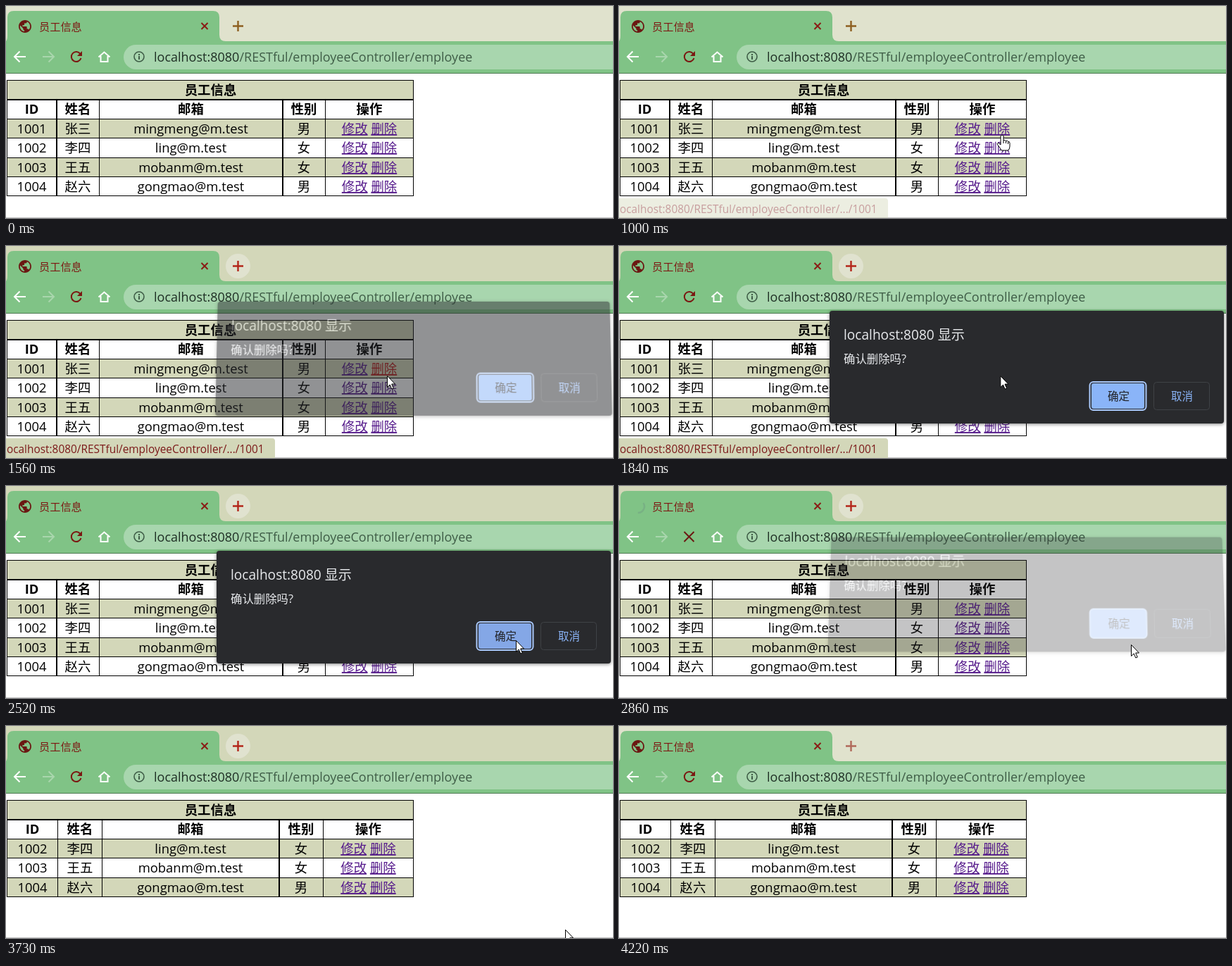
Recreate the animation shown at these times as an HTML page. Size 862 by 301 pixels, loop 4.55 s.

```html
<!DOCTYPE html>
<html lang="zh-CN">
<head>
<meta charset="utf-8">
<style>
html, body { margin: 0; width: 100%; height: 100%; overflow: hidden; background: #fff; }
body { position: relative; font-family: "Open Sans", "Noto Sans CJK SC", "Noto Sans CJK", sans-serif; }
svg { position: absolute; left: 0; top: 0; display: block; }
text { white-space: pre; }
.cell { font-size: 18.4px; text-anchor: middle; }
.link { fill: #551a8b; text-decoration: underline; }
.line { fill: none; stroke-width: 2; }
#dialog {
  position: absolute; left: 299px; top: 92px; width: 560px; height: 160px;
  background: #292a2d; border-radius: 4px; box-shadow: 0 1px 5px rgba(0,0,0,.5);
}
</style>
</head>
<body>
<svg width="862" height="301">
  <defs>
    <linearGradient id="titleFade" gradientUnits="userSpaceOnUse" x1="235" x2="266">
      <stop stop-color="#8a1a14"/><stop offset="1" stop-color="#8a1a14" stop-opacity="0"/>
    </linearGradient>
  </defs>
  <rect id="strip" width="862" height="51"/>
  <path fill="#80c386" d="M0 50Q2 48 2 42V16Q2 7 11 7H294Q303 7 303 16V41Q303 50 312 50H862V96H0Z"/>
  <rect y="95" width="862" height="1" fill="#4d7a52"/>
  <rect x="167" y="55" width="720" height="35" rx="17.5" fill="#a8d6ae"/>

  <path id="globe" fill="#6b1712" transform="translate(16.2 18.2) scale(.9)" d="M12 2C6.5 2 2 6.5 2 12s4.5 10 10 10 10-4.5 10-10S17.5 2 12 2zm-1 17.9c-3.9-.5-7-3.8-7-7.9 0-.6.1-1.2.2-1.8L9 15v1c0 1.1.9 2 2 2zm6.9-2.5c-.3-.8-1-1.4-1.9-1.4h-1v-3c0-.6-.4-1-1-1H8v-2h2c.6 0 1-.4 1-1V7h2c1.1 0 2-.9 2-2v-.4c2.9 1.2 5 4.1 5 7.4 0 2.1-.8 4-2.1 5.4z"/>
  <path id="spinner" class="line" style="stroke-width:2.5" d="M22 21.5A9 9 0 0 1 36 29"/>
  <text id="title" x="47" y="34.5" font-size="15.2" fill="#7d1a14">员工信息</text>
  <text id="loadingTitle" x="47" y="34.5" font-size="15.4" fill="url(#titleFade)">localhost:8080/RESTful/employee</text>
  <path class="line" stroke="#8a1a14" d="M277.5 24L286.5 33M286.5 24L277.5 33"/>
  <circle id="plusDisc" cx="329.5" cy="28.5" r="17.5" fill="#e0e2cf"/>
  <path id="plus" class="line" style="stroke-width:2.4" d="M322 28.5H337M329.5 21V36"/>

  <g class="line">
    <path stroke="#fff" d="M28 72H13M19.5 64.5L12 72L19.5 79.5"/>
    <path stroke="#a9d6ad" d="M52 72H67M60.5 64.5L68 72L60.5 79.5"/>
    <g id="reload">
      <path stroke="#7a1712" d="M105.5 68A7 7 0 1 0 106.5 74"/>
      <path fill="#7a1712" d="M108 64V71H101Z"/>
    </g>
    <path id="stop" stroke="#6b1712" d="M92.5 65L106.5 79M106.5 65L92.5 79"/>
    <path stroke="#fff" d="M131.5 72.5L139.5 65.5L147.5 72.5M134.5 71V79H144.5V71"/>
    <circle cx="189" cy="72" r="7" stroke="#3e5c46" stroke-width="1.6"/>
    <path stroke="#3e5c46" d="M189 71V76M189 68V70"/>
  </g>
  <text x="210" y="78.5" font-size="18" fill="#3f5d47"><tspan fill="#1f2f25">localhost:8080</tspan>/RESTful/employeeController/employee</text>

  <g id="before"></g>
  <g id="after"></g>
  <rect y="300" width="862" height="1" fill="#c6c6c6"/>
  <g id="status">
    <path fill="#d3d7b9" d="M0 273H378Q382 273 382 277V301H0Z"/>
    <text x="-3" y="293.5" font-size="15.4" fill="#7c1a1a">localhost:8080/RESTful/employeeController/.../1001</text>
  </g>
</svg>

<div id="dialog">
  <svg width="560" height="160">
    <text x="20" y="41" font-size="19.1" fill="#e8eaed">localhost:8080 显示</text>
    <text x="20" y="74" font-size="16.4" fill="#e8eaed">确认删除吗?</text>
    <rect id="ring" x="369.5" y="101" width="80" height="40" rx="5" stroke="#a9c8fa" stroke-width="2"/>
    <rect id="confirm" x="372" y="103" width="75" height="36" rx="3"/>
    <text x="410.5" y="127" font-size="15.5" text-anchor="middle" fill="#202124">确定</text>
    <rect x="460.5" y="101.5" width="79" height="39" rx="4" fill="none" stroke="#3f4246"/>
    <text x="500.5" y="127" font-size="15.5" text-anchor="middle" fill="#8ab4f8">取消</text>
  </svg>
</div>

<svg width="862" height="301">
  <g id="cursor" fill="#fff" stroke="#000" stroke-linejoin="round">
    <path id="arrow" d="M.5 .5V16.5L4.2 13L6.8 19L9.3 18L6.7 12H11.5Z"/>
    <path id="hand" d="M-2 1.5Q0 -1.5 2 1.5V8Q4 6.5 5.5 8.5Q7.5 7.5 8.5 9.5Q11 9 11 12V16Q11 19 9 22H-1Q-3 18 -6 14.5Q-8 11.5 -5 11.5L-2 14Z M2 8V12M5.5 9V12M8.5 10V13"/>
  </g>
</svg>

<script>
const LOOP = 4550, TAN = "#d3d7b9";
const $ = id => document.getElementById(id);
const clamp = v => Math.max(0, Math.min(1, v));
const ramp = (t, from, to) => clamp((t - from) / (to - from));
const show = (id, on) => { $(id).style.display = on ? "" : "none"; };

const employees = [
  ["1001", "张三", "mingmeng@m.test", "男"],
  ["1002", "李四", "ling@m.test", "女"],
  ["1003", "王五", "mobanm@m.test", "女"],
  ["1004", "赵六", "gongmao@m.test", "男"],
];

// Column edges are [x, line width] pairs.
function tableMarkup(edges, rows) {
  const rowTop = i => Math.round(105 + 27.4 * i);
  const bottom = rowTop(rows.length + 2);
  const rect = (x, y, w, h, fill) =>
    `<rect x="${x}" y="${y}" width="${w}" height="${h}" fill="${fill}"/>`;
  const cell = (x, row, content, extra = "") =>
    `<text class="cell" x="${x}" y="${rowTop(row) + 21}" ${extra}>${content}</text>`;
  const center = i => (edges[i][0] + edges[i + 1][0]) / 2 + .5;
  const bold = 'font-weight="700"';
  const links = '<tspan class="link">修改</tspan> <tspan class="link">删除</tspan>';

  let out = rect(1, 105, 578, 28, TAN);
  rows.forEach((_, i) => { if (i % 2 === 0) out += rect(1, rowTop(i + 2), 578, 28, TAN); });
  for (let i = 0; i <= rows.length + 2; i++)
    out += rect(1, rowTop(i), 578, i === 1 ? 2 : 1, "#000");
  edges.forEach(([x, w], i) => {
    const top = i === 0 || i === edges.length - 1 ? 105 : 133;
    out += rect(x, top, w, bottom - top + 1, "#000");
  });
  out += cell(290.5, 0, "员工信息", bold);
  ["ID", "姓名", "邮箱", "性别", "操作"].forEach((h, i) => out += cell(center(i), 1, h, bold));
  rows.forEach((r, j) => [...r, links].forEach((c, i) => out += cell(center(i), j + 2, c)));
  return out;
}
$("before").innerHTML = tableMarkup([[1, 1], [71, 2], [132, 1], [392, 2], [453, 1], [578, 1]], employees);
$("after").innerHTML = tableMarkup([[1, 1], [73, 1], [136, 1], [387, 2], [450, 1], [578, 1]], employees.slice(1));
const deleteLink = $("before").querySelectorAll(".link")[1];

// Pointer path: time, x, y
const path = [
  [260, 711, 290], [730, 547, 199], [800, 553, 190], [900, 544, 183], [1330, 544, 183],
  [1340, 541, 184], [1840, 541, 184], [1910, 560, 194], [2250, 724, 219], [2520, 724, 219],
  [2860, 727, 225], [2990, 732, 231], [3060, 744, 240], [3120, 757, 249], [3530, 786, 271], [3880, 800, 302],
];
function pointerAt(t) {
  const i = Math.max(1, path.findIndex(p => p[0] > t));
  const [a, b] = [path[i - 1], path[i]];
  const k = ramp(t, a[0], b[0]);
  return [a[1] + (b[1] - a[1]) * k, a[2] + (b[2] - a[2]) * k];
}

function render(t) {
  const active = t >= 1340 && t < 4220;
  const loading = t >= 2660 && t < 3300;
  const reloaded = t >= 3060;

  $("strip").setAttribute("fill", active ? TAN : "#e0e2cd");
  show("plusDisc", active);
  $("plus").setAttribute("stroke", active ? "#b3261a" : t >= 4220 ? "#b0695a" : "#8d5f20");

  show("globe", !loading);
  show("reload", !loading);
  show("stop", loading);
  show("spinner", loading);
  $("spinner").setAttribute("stroke", reloaded ? "#4f86ae" : "#78b184");
  $("spinner").setAttribute("transform", `rotate(${(t - 3120) * (reloaded ? .7 : -.35)} 27 29)`);
  show("title", !(loading && reloaded));
  show("loadingTitle", loading && reloaded);

  show("before", !reloaded);
  show("after", reloaded);
  deleteLink.style.fill = t >= 1340 && t < 2520 ? "#b81a1a" : "";
  $("status").style.opacity = ramp(t, 900, 1140) * (1 - ramp(t, 1910, 2250));

  // The dialog tilts, slides and fades together.
  const opened = 1 - (1 - ramp(t, 1470, 1770)) ** 2;
  const shown = opened * (1 - ramp(t, 2670, 2935));
  const away = 1 - shown;
  const dialog = $("dialog").style;
  dialog.opacity = shown;
  dialog.transform = away === 0 ? "none"
    : `translateY(${-26 * away}px) scaleY(${1 + .03 * away}) perspective(800px) rotateX(${7.5 * away}deg)`;
  const buttonColor = t >= 2200 && t < 2660 ? "#84a7e6" : "#8ab4f8";
  $("confirm").setAttribute("fill", buttonColor);
  $("ring").setAttribute("fill", t >= 2660 ? buttonColor : "none");

  const [x, y] = pointerAt(t);
  const overLink = t >= 790 && t < 1340;
  show("cursor", t >= 260 && t < 3880);
  show("hand", overLink);
  show("arrow", !overLink);
  $("cursor").setAttribute("transform", `translate(${x.toFixed(1)} ${y.toFixed(1)})`);
}

const start = performance.now();
function tick() {
  render((performance.now() - start) % LOOP);
  requestAnimationFrame(tick);
}
tick();
</script>
</body>
</html>
```
